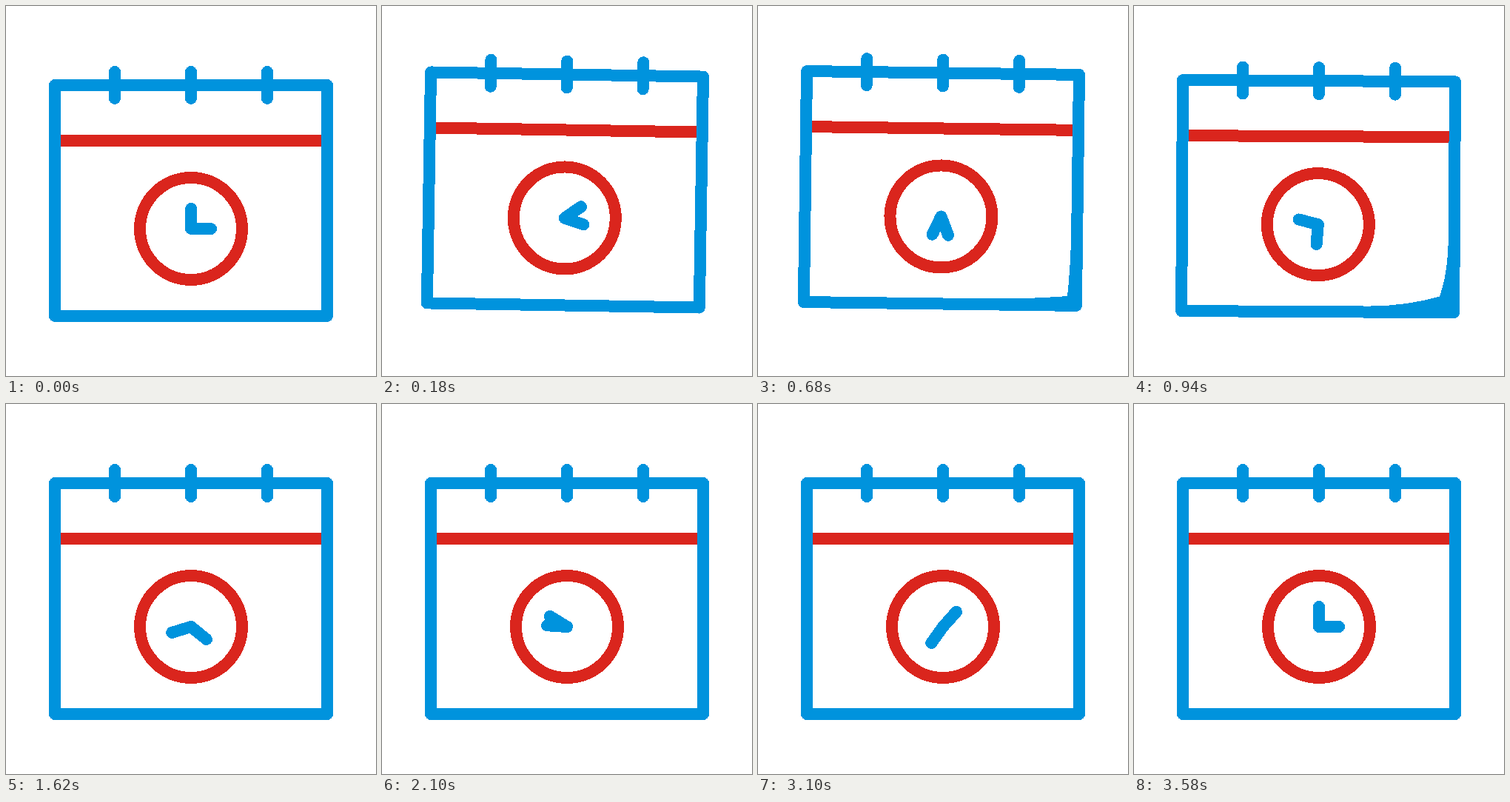
An HTML page without scripts that plays this animation: 500 px wide and 500 px high, repeating every 3600 ms.

```html
<!DOCTYPE html>
<html lang="en">
<head>
<meta charset="utf-8">
<title>Calendar with clock</title>
<style>
  html, body { margin: 0; width: 100%; height: 100%; overflow: hidden; background: #fff; }
  svg { display: block; width: 100%; height: 100%; shape-rendering: crispEdges; }

  svg {
    --loop: 3600ms infinite both;
    --sine: cubic-bezier(.37, 0, .63, 1);
    fill: none;
    stroke-width: 16;
    stroke-linecap: round;
    stroke-linejoin: round;
  }
  .blue { stroke: #0093dd; }
  .red { stroke: #da251d; stroke-linecap: butt; }

  .calendar {
    transform-origin: 250px 107px;
    animation: hop var(--loop), sway var(--loop) var(--sine);
  }
  .curl { animation: curl var(--loop) linear; }
  .hand { transform-origin: 250px 301px; }
  .minute { animation: minute var(--loop) linear; }
  .hour { animation: hour var(--loop) linear; }

  @keyframes hop {
    0% { translate: 0 0; animation-timing-function: var(--sine); }
    11.67% { translate: 0 -20px; animation-timing-function: cubic-bezier(.5, 0, .75, .75); }
    30%, 100% { translate: 0 0; }
  }
  @keyframes sway {
    0% { rotate: 0deg; }
    4.03% { rotate: 1deg; }
    13.9% { rotate: -1deg; }
    20.4% { rotate: 1deg; }
    29.9%, 100% { rotate: 0deg; }
  }
  @keyframes curl {
    0%, 15%, 44.4%, 100% { d: path("M318 419 Q370 419 434 419 Q434 370 434 318"); }
    30% { d: path("M318 419 Q370 419 416 399 Q434 370 434 318"); }
  }
  /* The hands rest for the last 20 ms of the loop. */
  @keyframes minute {
    0% { rotate: 0deg; }
    99.444%, 100% { rotate: 1080deg; }
  }
  @keyframes hour {
    0% { rotate: 90deg; }
    99.444%, 100% { rotate: 450deg; }
  }
</style>
</head>
<body>
<svg viewBox="0 0 500 500">
  <g class="calendar">
    <path class="red" d="M70 182H430"/>
    <circle class="red" cx="250" cy="301" r="69"/>
    <g class="blue">
      <rect x="66" y="107" width="368" height="312"/>
      <path d="M147 89V125M250 89V125M353 89V125"/>
      <path class="curl" d="M318 419 Q370 419 434 419 Q434 370 434 318"/>
      <path class="hand minute" d="M250 301V274"/>
      <path class="hand hour" d="M250 301V274"/>
    </g>
  </g>
</svg>
</body>
</html>
```
